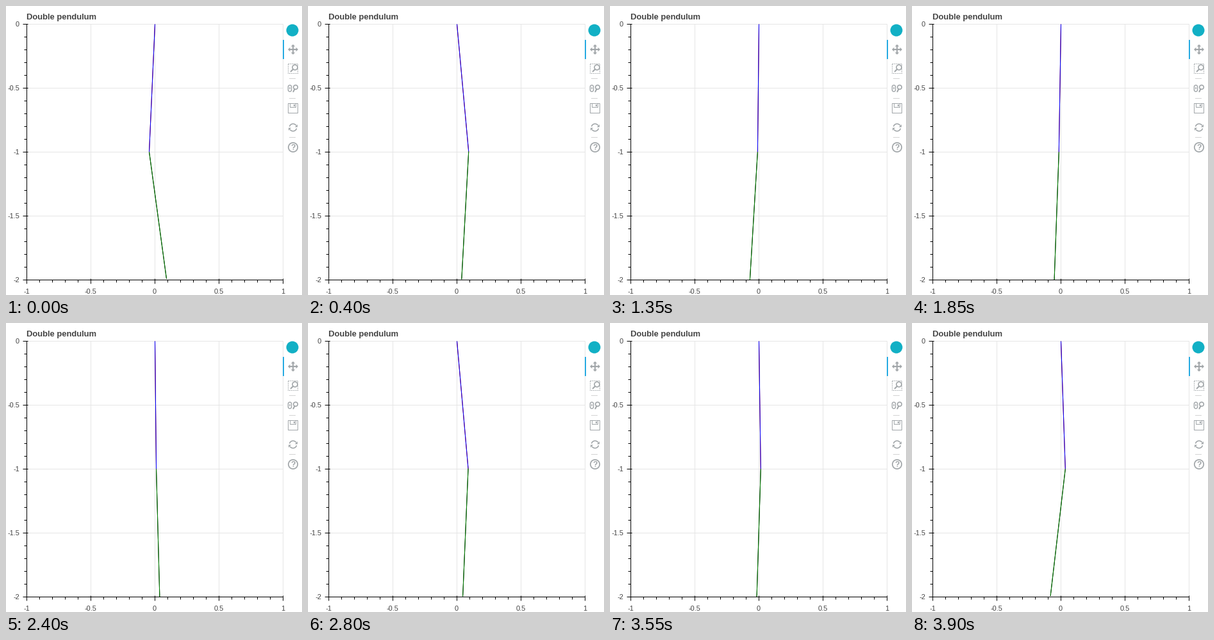
Animation of 462 by 452 pixels, one loop 3950 ms. Source, as a matplotlib script:

```python
import numpy as np
import matplotlib.pyplot as plt
from matplotlib.animation import FuncAnimation
from matplotlib.patches import Arc, Circle, FancyBboxPatch, Polygon, Rectangle

W, H, DPI = 462, 452, 64
PX = 72 / DPI                      # points per pixel
LEFT, TOP, UNIT = 32.5, 28.5, 200  # plot corner and pixels per data unit
RIGHT, BOTTOM = LEFT + 2 * UNIT, TOP + 2 * UNIT
FRAMES, INTERVAL = 79, 50
GRID, TEXT, ICON = "#e5e5e5", "#444444", "#a1a6a9"

plt.rcParams["font.family"] = "Liberation Sans"

fig = plt.figure(figsize=(W / DPI, H / DPI), dpi=DPI, facecolor="white")
ax = fig.add_axes([0, 0, 1, 1])
ax.set_xlim(0, W)
ax.set_ylim(H, 0)
ax.axis("off")


def line(xs, ys, color="black", lw=1.0, z=2, cap="butt"):
    return ax.plot(xs, ys, color=color, lw=lw * PX, zorder=z,
                   solid_capstyle=cap, snap=False)[0]


def label(x, y, s, size=11, ha="center", color=TEXT, **kw):
    ax.text(x, y, s, fontsize=size * PX, ha=ha, va="baseline", color=color, **kw)


def shape(patch, lw=0.0, fill=False, color=ICON):
    patch.set(facecolor=color if fill else "none", snap=False, zorder=5,
              edgecolor=color if lw else "none", linewidth=lw * PX)
    ax.add_patch(patch)


def draw_plot():
    for i in range(5):
        d = i * UNIT / 2
        line([LEFT + d] * 2, [TOP, BOTTOM], GRID, z=1)
        line([LEFT, RIGHT], [TOP + d] * 2, GRID, z=1)
        line([LEFT + d] * 2, [BOTTOM - 2, BOTTOM + 6], z=4)
        line([LEFT - 6, LEFT + 2], [TOP + d] * 2, z=4)
        label(LEFT + d - 0.5, 450, f"{i / 2 - 1:g}")
        label(21, TOP + d + 3.5, f"{-i / 2:g}" if i else "0", ha="right")
    for i in range(21):
        d = i * UNIT / 10
        line([LEFT + d] * 2, [BOTTOM, BOTTOM + 4], z=4)
        line([LEFT - 4, LEFT], [TOP + d] * 2, z=4)
    line([LEFT, LEFT], [TOP, BOTTOM], z=4, cap="projecting")
    line([LEFT, RIGHT], [BOTTOM, BOTTOM], z=4, cap="projecting")
    label(32.5, 21, "Double pendulum", 13, "left", weight="bold")


def magnifier(x, y, r, dx, dy):
    """Lens at (x, y) with a handle reaching to (x - dx, y + dy)."""
    shape(Circle((x, y), r), 1.6)
    k = r / np.hypot(dx, dy)
    line([x - k * dx, x - dx], [y + k * dy, y + dy], ICON, 2, 5, "round")


def draw_toolbar():
    shape(Circle((447, 38), 9.5), fill=True, color="#12b0c5")
    shape(Rectangle((432, 53), 2, 30), fill=True, color="#26aae1")
    for y in (113.5, 144.5, 205.5):
        line([442, 452], [y, y], "lightgray")

    # pan
    cx, cy = 448, 68
    line([cx - 6, cx + 6], [cy, cy], ICON, 2)
    line([cx, cx], [cy - 6, cy + 6], ICON, 2)
    head = np.array([[8, 0], [4.6, -3.3], [4.6, 3.3]])
    for k in range(4):
        c, s = np.cos(k * np.pi / 2), np.sin(k * np.pi / 2)
        shape(Polygon(head @ np.array([[c, s], [-s, c]]) + (cx, cy)), fill=True)

    # box zoom
    box = Rectangle((440.5, 90.5), 15, 15)
    shape(box, 1)
    box.set_linestyle((0, (1.8, 1.4)))
    magnifier(451, 96, 4, 6.4, 6.4)

    # wheel zoom
    shape(FancyBboxPatch((442.6, 126), 0.8, 5.6,
                         boxstyle="round,pad=2.2,rounding_size=2.6"), 1.4)
    line([443, 443], [127, 130], ICON, 1.4, 5)
    magnifier(452, 127, 3.3, 3.6, 7)

    # save
    shape(Rectangle((440.5, 152.5), 15, 15), 1)
    shape(Rectangle((443.5, 152.5), 9, 6), 1)
    shape(Rectangle((449, 154), 2, 3), fill=True)

    # reset
    cx, cy = 448, 190
    for start, sign in ((195, 1), (15, -1)):
        shape(Arc((cx, cy), 11.4, 11.4, theta1=start, theta2=start + 130), 1.6)
        shape(Polygon([(cx + 7 * sign, cy - 0.6 * sign),
                       (cx + 2.8 * sign, cy - 0.6 * sign),
                       (cx + 7 * sign, cy - 4.8 * sign)]), fill=True)

    # help
    shape(Circle((448, 221), 7.2), 1.7)
    label(448, 225, "?", 12, color=ICON, weight="bold", zorder=5)


draw_plot()
draw_toolbar()
rods = [[line([], [], c, z=3) for c in pair]
        for pair in (("#c00000", "blue"), ("black", "green"))]


def joints(n):
    """Pivot, elbow and tip from the two normal modes of equal arms."""
    slow = 0.0291 * np.cos(np.radians(6.864 * n - 29.5))
    fast = -0.0745 * np.cos(np.radians(16.4 * n + 19.5))
    angles = np.array([slow + fast, np.sqrt(2) * (slow - fast)])
    x = LEFT + UNIT + UNIT * np.cumsum([0, *np.sin(angles)])
    y = TOP + UNIT * np.cumsum([0, *np.cos(angles)])
    return x, y


def update(n):
    x, y = joints(n)
    for i, pair in enumerate(rods):
        for rod in pair:
            rod.set_data(x[i:i + 2], y[i:i + 2])
    return [rod for pair in rods for rod in pair]


anim = FuncAnimation(fig, update, frames=FRAMES, interval=INTERVAL,
                     init_func=lambda: update(0), repeat=True, repeat_delay=0)
plt.show()
```
